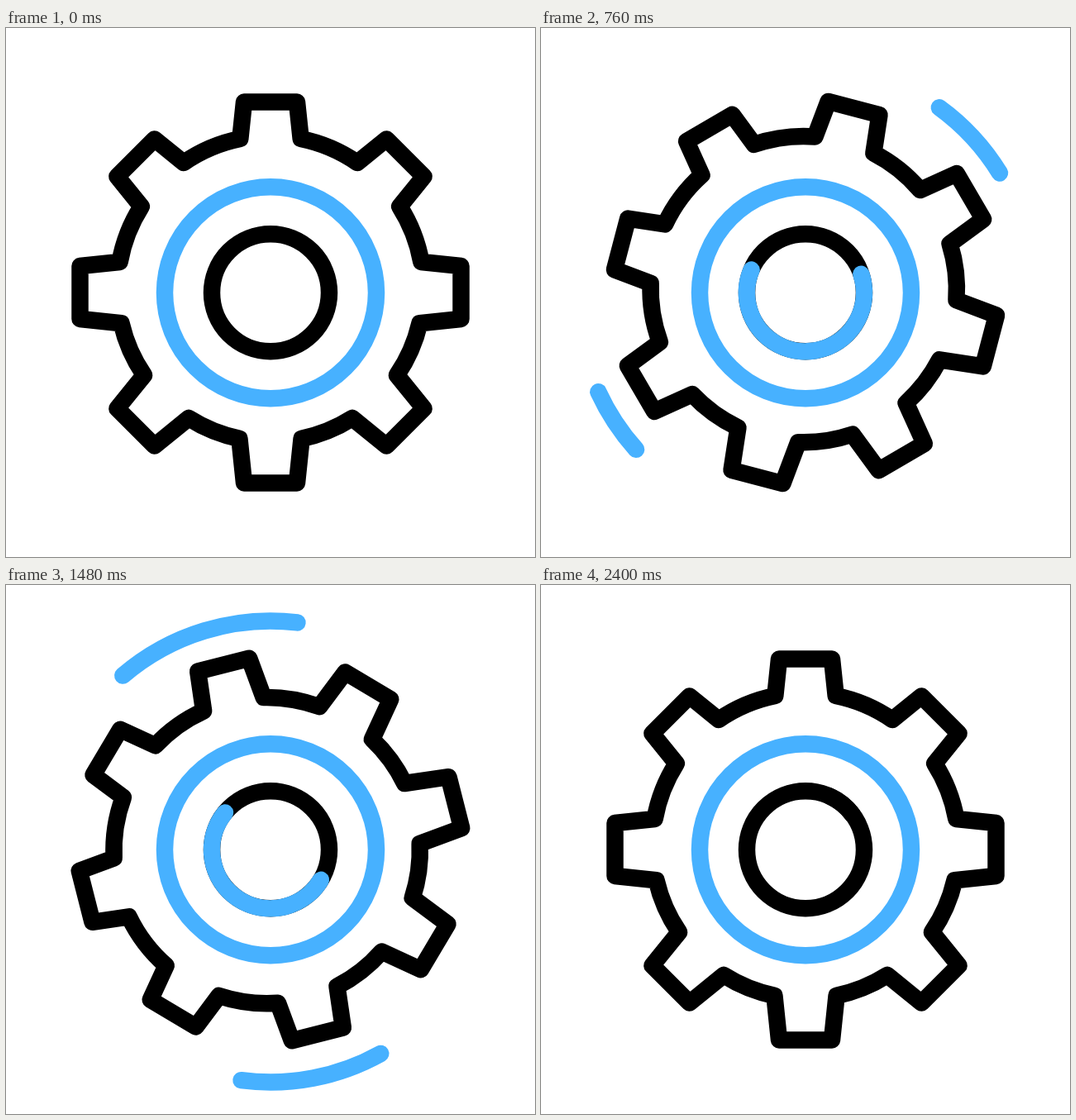
Animation, 640 px wide and 640 px high, one loop 2.48 s. Source, as an HTML page with a canvas:

```html
<!DOCTYPE html>
<html lang="en">
<head>
<meta charset="utf-8">
<title>Turning gear</title>
<style>
  html, body { margin: 0; width: 100%; height: 100%; overflow: hidden; background: #fff; }
  canvas { display: block; width: 100vmin; height: 100vmin; }
</style>
</head>
<body>
<canvas id="stage" width="640" height="640"></canvas>
<script>
const ctx = document.getElementById('stage').getContext('2d');
const LOOP = 2480, STEP = 40, RAD = Math.PI / 180;
const BLACK = '#000', BLUE = '#47b1ff';

// Progress from 0 to 1 along cubic-bezier(x1, 0, x2, 1).
function ease(t, start, end, x1, x2) {
  const x = Math.min(1, Math.max(0, (t - start) / (end - start)));
  let low = 0, high = 1;
  for (let i = 0; i < 24; i++) {
    const u = (low + high) / 2, v = 1 - u;
    if (3 * x1 * u * v * v + 3 * x2 * u * u * v + u ** 3 < x) low = u;
    else high = u;
  }
  return low * low * (3 - 2 * low);
}

// Eight tapered teeth; the rim between them is centred a little above the axis.
function drawGear(angle) {
  const teeth = 8, tipRadius = 232.7, tipWidth = 32, taper = 0.105;
  const rim = 185.2, rise = 4.5, tipHeight = 230.5;

  const place = (a, across, out) =>
    [out * Math.sin(a) + across * Math.cos(a), across * Math.sin(a) - out * Math.cos(a)];
  const rootAngle = (a, side) => {
    const offset = side * 36.7 + rise * Math.sin(a);
    const out = rise * Math.cos(a) + Math.sqrt(rim * rim - offset * offset);
    const [x, y] = place(a, side * (tipWidth + taper * (tipHeight - out)), out);
    return Math.atan2(y + rise, x);
  };

  ctx.save();
  ctx.translate(320, 320);
  ctx.rotate(angle * RAD);
  ctx.beginPath();
  for (let k = 0; k < teeth; k++) {
    const a = k * 2 * Math.PI / teeth, next = a + 2 * Math.PI / teeth;
    ctx.lineTo(...place(a, -tipWidth, tipHeight));
    ctx.lineTo(...place(a, tipWidth, tipHeight));
    ctx.arc(0, -rise, rim, rootAngle(a, 1), rootAngle(next, -1));
  }
  ctx.closePath();
  ctx.strokeStyle = BLACK;
  ctx.stroke();
  ctx.restore();
}

// Angles in degrees, clockwise from the top.
function arc(color, cy, rx, ry, from = 0, to = 360) {
  if (to - from < 0.5) return;
  ctx.strokeStyle = color;
  ctx.beginPath();
  ctx.ellipse(320, cy, rx, ry, 0, (from - 90) * RAD, (to - 90) * RAD);
  ctx.stroke();
}
const ring = (color, radius, from, to) => arc(color, 320.3, radius, radius, from, to);
const sweep = (from, length) => arc(BLUE, 322.5, 276.5, 279, from, from + length);

function draw(t) {
  const back = ease(t, 1210, 2400, 0.575, 0.425);
  const angle = 112 * (back - ease(t, 0, 1210, 0.94, 0.74));

  ctx.fillStyle = '#fff';
  ctx.fillRect(0, 0, 640, 640);
  ctx.lineWidth = 20.5;
  ctx.lineCap = ctx.lineJoin = 'round';

  drawGear(angle);
  ring(BLUE, 128);
  ring(BLACK, 71);

  const hubFrom = angle + 350 - 500 * ease(t, 300, 1210, 0.46, 0.56)
    + 203.5 * ease(t, 1210, 2050, 0.82, 0.44);
  const hubTo = angle + 350 - 296.5 * ease(t, 480, 1440, 0.67, 0.455);
  ring(BLUE, 71, hubFrom, hubTo);
  if (t > 1600) ring(BLACK, 71, hubFrom - 30, hubFrom);

  const from = angle + 114 - 69 * ease(t, 480, 940, 0.235, 0.67)
    + 19 * ease(t, 940, 1480, 0.33, 0.67);
  const length = 47 * (ease(t, 480, 1210, 0.245, 0.484) - ease(t, 1490, 2090, 0.4, 0.6));
  sweep(from, length);
  sweep(from + 192 - 8 * back, 0.77 * length);
}

const start = performance.now();
function tick() {
  const t = (performance.now() - start) % LOOP;
  draw(Math.floor(t / STEP) * STEP);
  requestAnimationFrame(tick);
}
tick();
</script>
</body>
</html>
```
